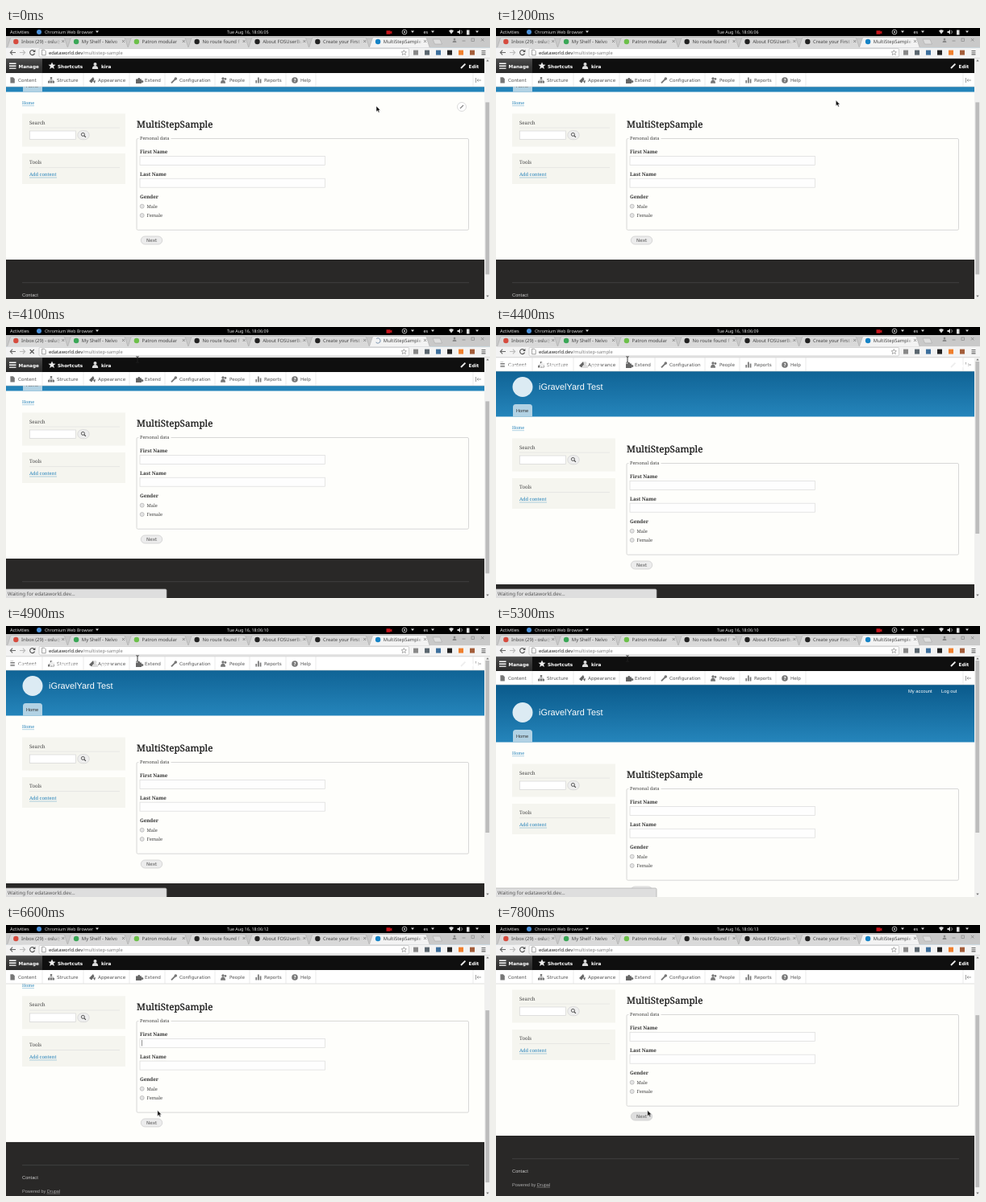
Recreate the animation shown at these times as an HTML page. Size 600 px wide and 337 px high, loop 8 s.

```html
<!DOCTYPE html>
<html lang="en">
<head>
<meta charset="utf-8">
<title>Multi-step form</title>
<style>
html, body { margin: 0; width: 100%; height: 100%; overflow: hidden; background: #fefefb; }
body > svg { display: block; width: 100vw; height: 100vh; }
text { text-rendering: geometricPrecision; white-space: pre; }
.ui { font-family: "Noto Sans", "Open Sans", sans-serif; }
.bar { font-family: "DejaVu Sans", sans-serif; }
.serif { font-family: "Noto Serif", serif; }
.sans { font-family: "Liberation Sans", Arial, sans-serif; }
.b { font-weight: 700; }
</style>
</head>
<body>
<svg id="stage" viewBox="0 0 600 337"></svg>
<script>
const text = (x, y, size, str, fill, cls, extra = '') =>
  `<text x="${x}" y="${y}" font-size="${size}" fill="${fill}" class="${cls}" ${extra}>${str}</text>`;
const rect = (x, y, w, h, fill, extra = '') =>
  `<rect x="${x}" y="${y}" width="${w}" height="${h}" fill="${fill}" ${extra}/>`;
const circle = (x, y, r, fill, extra = '') =>
  `<circle cx="${x}" cy="${y}" r="${r}" fill="${fill}" ${extra}/>`;
const line = (d, stroke, width = .8, extra = '') =>
  `<path d="${d}" fill="none" stroke="${stroke}" stroke-width="${width}" ${extra}/>`;
const shape = (d, fill, extra = '') => `<path d="${d}" fill="${fill}" ${extra}/>`;
const group = (id, body) => `<g id="${id}">${body}</g>`;
const down = (x, y, fill) => shape(`M${x - 2} ${y - 1}h4l-2 2.4z`, fill);

const ink = '#444', link = '#1f7fb8', edge = 593;

// Page, laid out for scroll position 0
const field = y => rect(166, y, 229.5, 11, '#fefefe', 'stroke="#dadada" stroke-width=".7"');
const label = (y, str) => text(166, y, 6.15, str, '#333', 'serif b');
const radio = (y, str) =>
  circle(168.7, y, 2.5, '#e4e4e4', 'stroke="#b0b0b0" stroke-width=".7"') +
  text(174.5, y + 2.2, 5.7, str, ink, 'serif');
const block = (y, h, title) =>
  rect(20, y, 128, h, '#f5f5ef') +
  text(29, y + 13, 6.1, title, ink, 'serif') +
  line(`M29 ${y + 17.6}H141`, '#dcdcdc', .6);
const page =
  rect(0, 73, 600, 290, '#fefefb') +
  rect(0, 73, 600, 71.5, 'url(#sky)') +
  circle(33, 107.5, 12.5, '#dcebf3') +
  text(53, 111, 10.9, 'iGravelYard Test', '#fff', 'sans') +
  text(511, 82.5, 5.8, 'My account', '#fff', 'sans') +
  text(552, 82.5, 5.8, 'Log out', '#fff', 'sans') +
  shape('M21 144.5V132.5q0-3.5 3.5-3.5H41.5q3.5 0 3.5 3.5V144.5z', '#b2d2e4') +
  text(25, 139.3, 5.7, 'Home', '#333', 'sans') +
  text(20, 160.2, 5.3, 'Home', link, 'serif') + line('M20 161.7H35', link, .35) +
  block(171.5, 41, 'Search') +
  rect(29.3, 193, 57, 10.5, '#fff', 'stroke="#d4d4d4" stroke-width=".7"') +
  rect(88.8, 192.7, 14.4, 11, '#eee', 'rx="5.5" stroke="#d0d0d0" stroke-width=".7"') +
  circle(95.4, 197.4, 2, 'none', 'stroke="#444" stroke-width=".9"') +
  line('M96.9 198.9l2 2', '#444', 1.1) +
  block(221, 38, 'Tools') +
  text(29, 249.3, 5.8, 'Add content', link, 'serif') + line('M29 251H63', link, .35) +
  text(162, 189.3, 11.65, 'MultiStepSample', '#111', 'serif', 'stroke="#111" stroke-width=".22"') +
  rect(162, 202.5, 411.5, 113.7, 'none', 'rx="1.5" stroke="#cfcfcf" stroke-width=".8"') +
  rect(164.5, 200, 40, 5, '#fefefb') +
  text(166, 204.4, 5.6, 'Personal data', ink, 'serif') +
  label(221.2, 'First Name') + field(224.5) +
  label(249.1, 'Last Name') + field(252.2) +
  label(277.2, 'Gender') + radio(286.7, 'Male') + radio(298, 'Female') +
  rect(167.3, 324, 26.4, 10, '#ececec', 'id="next" rx="5" stroke="#cfcfcf" stroke-width=".8"') +
  text(174, 331.1, 5.7, 'Next', '#555', 'bar') +
  rect(0, 353, 600, 120, '#292827') +
  line('M20 381.7H574', '#4a4a4a', .7) +
  text(20, 399.1, 5.75, 'Contact', '#c8c8c8', 'sans') +
  text(20, 415.6, 5.55, 'Powered by Drupal', '#aaa', 'sans') +
  line('M50.5 417.2H67', '#ccc', .4) +
  group('edit', circle(565, 163, 5.5, '#fff', 'stroke="#ccc" stroke-width=".7"') +
    line('M563 165l4-4', '#888', 1.2)) +
  rect(168.1, 226, .7, 7.6, '#666', 'id="caret"');

// Admin toolbar
const trayItems = [
  [8, 'Content'], [56, 'Structure'], [107, 'Appearance'], [165, 'Extend'],
  [208, 'Configuration'], [270, 'People'], [313, 'Reports'], [358, 'Help']
];
const icons = [
  shape('M-2.6-3.8h3.4l2 2v5.4h-5.4z', '#777'),
  shape('M-1.2-4h2.4v2.6h-2.4zM-4 1h2.4v2.6H-4zM-1.2 1h2.4v2.6h-2.4zM1.6 1H4v2.6H1.6z', '#777') +
    line('M0-2V1M-2.8 1v-1H2.8v1', '#777', .6),
  shape('M-4 1L1-4l1.5 3L-1 3.5zM1 1l3-1-1 4z', '#666'),
  shape('M-4-1.5h2.4a1.4 1.4 0 1 1 2.8 0H3V.4a1.4 1.4 0 1 1 0 2V4h-7z', '#666'),
  line('M-3 3.4L2-1.6', '#777', 2) + circle(2.3, -2, 1.8, '#777'),
  circle(-1, -2, 1.7, '#777') + circle(2, -1.6, 1.3, '#777') + shape('M-4 3.8q0-4 3-4t3 4z', '#777'),
  shape('M-3.6 0h1.7v3.6h-1.7zM-1-3.6H.7v7.2H-1zM1.7-1.6h1.7v5.2H1.7z', '#777'),
  circle(0, 0, 3.8, '#777') + text(-1.4, 2, 5.6, '?', '#fff', 'bar b')
];
const tray =
  rect(0, 56, edge, 17, '#fff') + line(`M0 73H${edge}`, '#ccc', .6) +
  trayItems.map(([x, str], i) =>
    `<g transform="translate(${x} 65)">${icons[i]}</g>` +
    text(x + 7, 67.1, 5.7, str, '#555', 'bar')).join('') +
  line([45, 96, 153, 197, 259, 302, 347, 384, 579].map(x => `M${x} 56v17`).join(''), '#ddd', .6) +
  line('M582.5 62v6M589 65h-5m1.5-1.5L584 65l1.5 1.5', '#888', .8);
const barBack = rect(0, 38, edge, 18, '#0f0f0f') + rect(0, 38, 45, 18, 'url(#active)');
const barText =
  line('M4 44.3H12.5M4 47.2H12.5M4 50.1H12.5', '#fff', 1.4) +
  text(15.5, 49.6, 5.7, 'Manage', '#fff', 'bar b') +
  shape('M57 42.6l1.3 3 3.2.2-2.5 2 .9 3.3-2.9-1.8-2.9 1.8.9-3.3-2.5-2 3.2-.2z', '#eee') +
  text(64, 49.6, 5.7, 'Shortcuts', '#fff', 'bar b') +
  circle(110.5, 45, 2, '#ddd') + shape('M106.8 51q0-4 3.7-4t3.7 4z', '#ddd') +
  text(118, 49.6, 5.7, 'kira', '#fff', 'bar b') +
  line('M564 50l5.4-5.4', '#eee', 1.9) +
  text(573.5, 49.6, 5.7, 'Edit', '#fff', 'bar b');

// Browser window
const tabs = [
  ['Inbox (29) - oslu@', '#d64b3e'], ['My Shelf - Nelvo', '#3aa757'],
  ['Patron modular', '#6cc04a'], ['No route found f', '#222'],
  ['About FOSUserBundle', '#222'], ['Create your First B', '#222'], ['MultiStepSample', '#1583c6']
];
const tab = ([title, color], i) => {
  const x = 1.5 + i * 74.8, on = i === 6, fill = on ? 'Lit' : 'Dim';
  return shape(`M${x} 24.5l4-12q.5-1 2-1h63q1.5 0 2 1l4 12z`, on ? '#f3f3f3' : '#d9d9d9',
      'stroke="#a9a9a9" stroke-width=".6"') +
    `<g ${on ? 'id="favicon"' : ''}>${circle(x + 10.8, 17, 3.2, color)}</g>` +
    `<svg x="${x + 17.5}" y="11" width="49" height="13">` +
    text(0, 7.9, 5.9, title, '#444', 'ui') + rect(41, 1, 8, 12, `url(#fade${fill})`) + '</svg>' +
    line(`M${x + 67.7} 15l3 3m0-3l-3 3`, '#777', .8);
};
const extensions = [[508, '#888'], [522, '#5b6770'], [536, '#3d6f9c'], [550, '#222'], [564, '#ef7f2d'], [578, '#a35d3a']];
const chrome =
  rect(0, 0, 600, 10, '#000') +
  text(5, 7.1, 5.7, 'Activities', '#e6e6e6', 'ui') +
  circle(41, 5, 3, '#4a8fd8') +
  text(48, 7, 5.25, 'Chromium Web Browser', '#e6e6e6', 'ui') + down(113, 4.6, '#ddd') +
  text(274, 7, 5.3, '', '#eee', 'ui', 'id="clock"') +
  shape('M471.5 3.2h5v4.6h-5zM476 5l2.4-1.6v4.2L476 6z', '#c8151b') +
  circle(494, 5, 2.9, 'none', 'stroke="#ddd" stroke-width=".8"') + circle(494, 5, 1, '#ddd') + down(504, 4.6, '#ddd') +
  text(517.5, 7, 5.5, 'es', '#eee', 'ui') + down(529, 4.6, '#ddd') +
  shape('M549 3.5q3-2.4 6 0l-3 4zM559.5 4h1.5l2-2v6l-2-2h-1.5z', '#ddd') +
  line('M564.5 3q2 2 0 4', '#ddd', .7) + rect(571, 2.5, 3.5, 6, '#ddd') + down(584, 4.6, '#ddd') +
  rect(0, 10, 600, 14.5, '#c9c9c9') +
  tabs.map(tab).join('') +
  shape('M529 14h9l2.5 6h-9z', '#dedede', 'stroke="#aaa" stroke-width=".6"') +
  circle(556, 14, 1.3, '#888') + shape('M553.6 18q0-2.6 2.4-2.6t2.4 2.6z', '#888') +
  line('M565.5 16h4M589 13l3.4 3.4m0-3.4l-3.4 3.4', '#888', .8) +
  rect(577, 13, 3.6, 3.6, 'none', 'stroke="#888" stroke-width=".7"') +
  rect(0, 24.3, 600, 13.7, '#f3f3f3') + line('M0 37.8H600', '#bbb', .6) +
  line('M12 30.5H5.5m2.6-2.8l-2.8 2.8 2.8 2.8', '#666', 1.1) +
  line('M17 30.5h6.5m-2.6-2.8l2.8 2.8-2.8 2.8', '#bbb', 1.1) +
  group('reload', line('M35.2 29a3 3 0 1 0 .3 2.5', '#555', 1.1) + shape('M36.4 26.8v3.2h-3.2z', '#555')) +
  group('stop', line('M29.7 28l5 5m0-5l-5 5', '#555', 1.1)) +
  rect(41, 25.4, 458.5, 10.6, '#fff', 'rx="1.5" stroke="#bdbdbd" stroke-width=".7"') +
  shape('M44.6 27.2h3l1.6 1.6v5h-4.6z', '#fff', 'stroke="#777" stroke-width=".7"') +
  rect(52.7, 26.6, 92.6, 8.2, '#4a8fd9', 'id="selection"') +
  `<text x="53" y="32.7" font-size="5.8" class="ui" id="url"><tspan>edataworld.dev</tspan><tspan>/multistep-sample</tspan></text>` +
  line('M493.3 27.5l.9 2.1 2.2.2-1.7 1.5.6 2.2-2-1.2-2 1.2.6-2.2-1.7-1.5 2.2-.2z', '#777', .6) +
  extensions.map(([x, c]) => rect(x - 3, 27.6, 6, 6, c)).join('') +
  line('M589.5 28.5h5M589.5 30.7h5M589.5 32.9h5', '#666', 1.1);

const overlay =
  rect(edge, 38, 7, 299, '#f0f0ef') +
  shape('M595.3 41.4h3.4l-1.7-2.2zM595.3 332.6h3.4l-1.7 2.2z', '#777') +
  rect(594.4, 43, 4.8, 214, '#bcbcbc', 'id="thumb"') +
  group('status', rect(-2, 326, 201, 13, '#dedede', 'rx="1.5" stroke="#aaa" stroke-width=".7"') +
    text(2, 333.8, 6.2, 'Waiting for edataworld.dev...', '#555', 'ui')) +
  rect(0, 321.5, 1.3, 16, '#222', 'id="sliver"') +
  group('notice', rect(206, 12, 188, 23, '#222527', 'rx="3" stroke="#111" stroke-width=".5" opacity=".97"') +
    rect(211, 16, 13, 13, '#c4161c') +
    text(228, 21.8, 5.07, '', '#f0f0f0', 'ui b', 'id="count"')) +
  group('arrow', shape('M0 0V7.2L1.7 5.7 2.9 8.2 4.1 7.6 3 5.2H5.1z', '#111', 'stroke="#fff" stroke-width=".5"')) +
  group('ibeam', line('M-1.6-3.8Q0-3.8 0-3Q0-3.8 1.6-3.8M0-3V3M-1.6 3.8Q0 3.8 0 3Q0 3.8 1.6 3.8', '#222', .9));

const grad = (id, from, to, dir, fromAlpha = 1) =>
  `<linearGradient id="${id}" x2="${dir === 'x' ? 1 : 0}" y2="${dir === 'y' ? 1 : 0}">
   <stop stop-color="${from}" stop-opacity="${fromAlpha}"/><stop offset="1" stop-color="${to}"/></linearGradient>`;

document.getElementById('stage').innerHTML =
  '<defs>' + grad('sky', '#0a5a8b', '#2585bb', 'y') + grad('active', '#4a4a4a', '#292929', 'y') +
  grad('fadeLit', '#f3f3f3', '#f3f3f3', 'x', 0) + grad('fadeDim', '#d9d9d9', '#d9d9d9', 'x', 0) + '</defs>' +
  group('page', page) + group('tray', tray) + group('barBack', barBack) + barText + chrome +
  group('spinner', circle(461, 17, 3.4, '#f3f3f3') + line('M461 14a3 3 0 1 1-3 3', '#8aa0b8', 1)) + overlay;

const $ = id => document.getElementById(id);
const show = (id, on) => $(id).setAttribute('visibility', on ? 'visible' : 'hidden');
const move = (id, x, y) => $(id).setAttribute('transform', `translate(${x} ${y})`);
const part = (t, a, b) => Math.min(1, Math.max(0, (t - a) / (b - a)));
const smooth = p => p * p * (3 - 2 * p);
const mix = (a, b, p) => a + (b - a) * p;
const [host, path] = $('url').children;

function pointer(t) {
  if (t < 5500) {
    const p = smooth(part(t, 1000, 1900));
    return [mix(459, 163, p), mix(97, 40.5, p), p === 1];
  }
  if (t < 6500) {
    const p = smooth(part(t, 5500, 6100)), y = mix(40.5, 234, p);
    return [mix(163, 190.5, p), y, y > 224 || p === 0];
  }
  return [187.8, 230.5, false];
}

function draw(t) {
  const loading = t >= 3000 && t < 4400;
  const bare = t >= 4400 && t < 5000;
  const scroll = t < 4400 ? 65 : bare ? 33 : 91 * (1 - (1 - part(t, 6400, 6700)) ** 2.2);

  move('page', 0, -scroll);
  move('thumb', 0, bare ? 0 : scroll * .76);
  move('tray', 0, bare ? -18 : 0);
  show('barBack', !bare);
  show('edit', t < 1200);
  show('caret', t >= 6000 && t < 6700 || t >= 7200 && t < 7800);
  $('next').setAttribute('fill', t >= 6700 ? '#dedede' : '#ececec');

  const selected = t >= 2400 && t < 3000;
  show('selection', selected);
  host.setAttribute('fill', selected ? '#fff' : '#222');
  path.setAttribute('fill', selected ? '#fff' : '#808080');
  show('reload', !loading);
  show('stop', loading);
  show('favicon', !loading);
  show('spinner', loading);
  $('spinner').setAttribute('transform', `rotate(${-t * .36} 461 17)`);
  show('status', t >= 3500 && t < 5500);
  show('sliver', t >= 5500 && t < 6500);

  const second = 5 + Math.floor((t + 500) / 1000);
  $('clock').textContent = 'Tue Aug 16, 18:06:' + String(second).padStart(2, '0');
  $('count').textContent = `EasyScreenCast -> Recording in progress / Seconds passed : ${second - 6}`;
  const shown = (1 - (1 - part(t, 1600, 2000)) ** 2) * (1 - part(t, 3500, 3800));
  show('notice', shown > 0);
  move('notice', 0, -23 * (1 - shown));
  $('notice').setAttribute('opacity', shown);

  const [x, y, typing] = pointer(t);
  show('arrow', !typing);
  show('ibeam', typing);
  move('arrow', x, y);
  move('ibeam', x, y);
}

function tick(now) {
  draw(now % 8000);
  requestAnimationFrame(tick);
}
draw(0);
requestAnimationFrame(tick);
</script>
</body>
</html>
```
